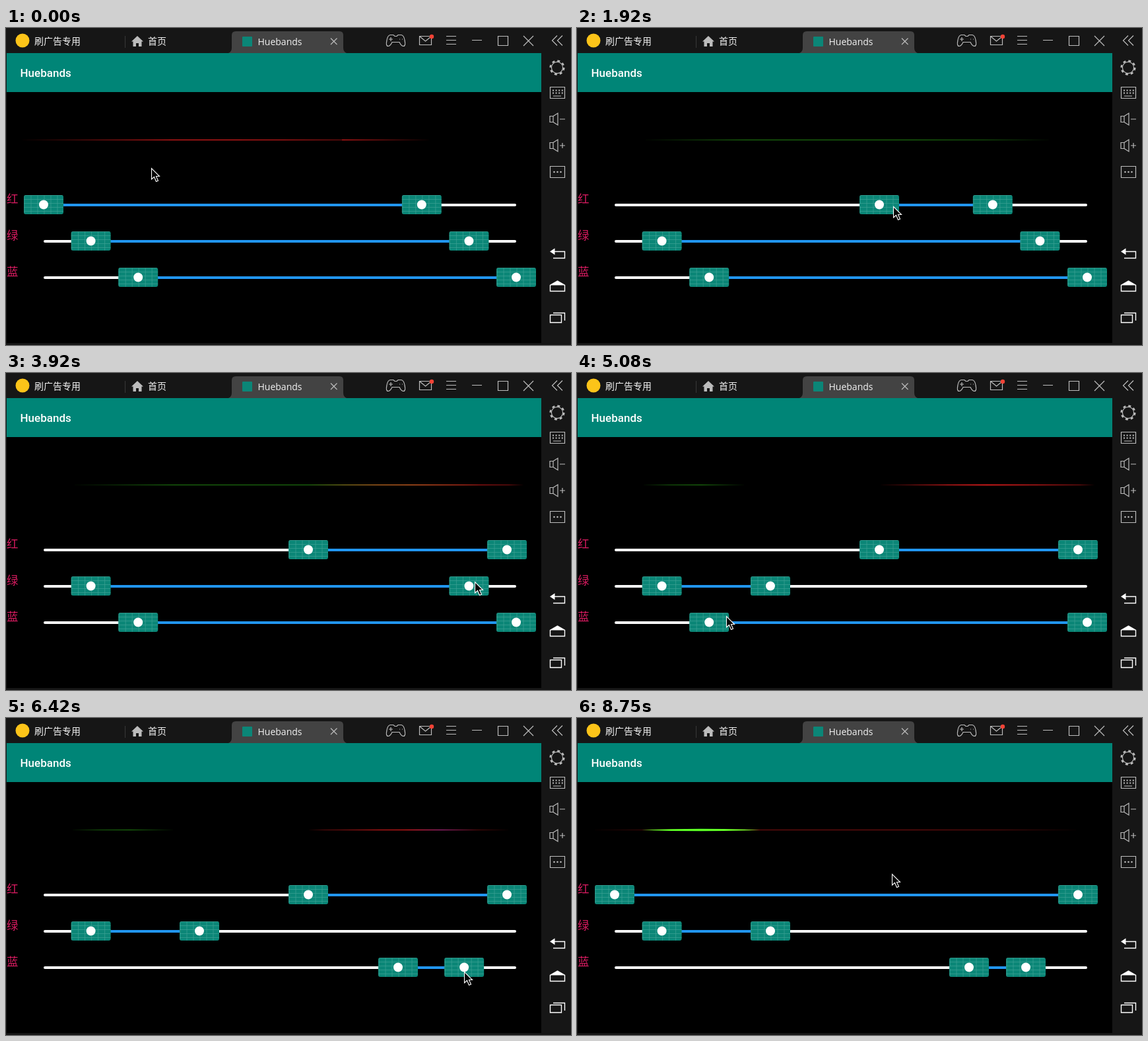
An HTML page that plays this animation: 856 px wide and 480 px high, repeating every 8830 ms.

```html
<!DOCTYPE html>
<html lang="zh">
<head>
<meta charset="utf-8">
<title>Huebands</title>
<style>
  html, body { margin: 0; width: 100%; height: 100%; overflow: hidden; background: #000; }
  svg { display: block; width: 856px; height: 480px; }
  .cjk { font-family: "Noto Sans CJK SC", "Noto Sans CJK", sans-serif; }
  .label { font-size: 17.5px; fill: #d81b60; }
  .icon { fill: none; stroke: #bcbcbc; stroke-width: 1.2; }
  .nav { stroke: #fff; stroke-width: 1.4; }
  .solid { fill: #fff; stroke: none; }
  .dots { stroke-width: 2.6; stroke-linecap: round; stroke-dasharray: 0 5; }
  .rail { stroke: #fff; stroke-width: 4; stroke-linecap: round; }
  .range { stroke: #2196f3; stroke-width: 4; }
  #waves { isolation: isolate; }
  #waves path { mix-blend-mode: screen; }
</style>
</head>
<body>
<svg viewBox="0 0 856 480">
  <defs>
    <pattern id="grid" x="-29.5" y="-14.5" width="10" height="6" patternUnits="userSpaceOnUse">
      <path d="M0 .5h10M.5 0v6" stroke="#5cb3a8" stroke-width=".7" opacity=".6"/>
    </pattern>
    <g id="thumb">
      <rect x="-30" y="-14.5" width="60" height="29" rx="3" fill="#0b8677"/>
      <rect x="-30" y="-14.5" width="60" height="29" rx="3" fill="url(#grid)"/>
      <circle r="7" fill="#fff"/>
    </g>
    <path id="speaker" d="M-11-4.5h5v9h-5zM-6-4.5 1-9V9l-7-4.5"/>
    <path id="chevron" d="M7.5-7.5 0 0l7.5 7.5"/>
  </defs>

  <rect width="856" height="480" fill="#161616"/>
  <rect x="1" y="38" width="810" height="439" fill="#000"/>
  <rect x="1" y="38" width="810" height="59" fill="#008577"/>
  <text x="21.5" y="73.5" font-family="Roboto, sans-serif" font-size="17" font-weight="500" fill="#fff">Huebands</text>

  <!-- title bar -->
  <circle cx="25" cy="19" r="10.5" fill="#fcc419"/>
  <g class="cjk" font-size="14" fill="#f2f2f2">
    <text x="43" y="24.5">刷广告专用</text>
    <text x="215" y="25">首页</text>
  </g>
  <path d="M180.5 12v18" stroke="#383838"/>
  <path d="M190 20.5 199 12l9 8.5h-2.5V28h-4.5v-5h-4v5h-4.5v-7.5z" fill="#bcbcbc"/>
  <path d="M337 38q5-2 5-8V11q0-6 6-6h157q6 0 6 6v19q0 6 5 8z" fill="#434343"/>
  <rect x="358" y="13" width="15" height="15" rx="1" fill="#0b8677"/>
  <text x="381.5" y="25.5" font-family="Open Sans, sans-serif" font-size="14" fill="#f2f2f2">Huebands</text>
  <g class="icon">
    <path d="M492 15.5l9.5 9.5M501.5 15.5 492 25"/>
    <path d="M582 10.5h5l2 2h3l2-2h5q4 1 5 8 2 9-2 9-3 0-6-6h-11q-3 6-6 6-4 0-2-9 1-7 5-8zM580 17h6M583 14v6M596 17h1M600 17h1"/>
    <path d="M626.5 12.5h18v13h-18zl9 7.5 9-7.5"/>
    <path d="M667 12.5h15M667 18.5h15M667 24.5h15"/>
    <path d="M706 18.5h15M745.5 12.5h15v14h-15zM784 12l15 15M799 12 784 27"/>
    <use href="#chevron" x="827.5" y="19"/>
    <use href="#chevron" x="835.5" y="19"/>
  </g>
  <circle cx="645" cy="13" r="3.2" fill="#f44336"/>

  <!-- side bar -->
  <g class="icon">
    <circle cx="835" cy="60" r="8.6"/>
    <circle cx="835" cy="60" r="10.3" stroke-width="2.5" stroke-dasharray="4 4.09"/>
    <path d="M824.5 89.5h22v17h-22zM829 103h12"/>
    <path d="M828 94.5h16M828 98.5h16" stroke-width="2" stroke-dasharray="2 2.6"/>
    <use href="#speaker" x="835" y="138"/>
    <use href="#speaker" x="835" y="178"/>
    <path d="M839 138h8M839 178h8M843 174v8"/>
    <path d="M824.5 209.5h22v17h-22z"/>
    <path class="dots" d="M830.5 218h11"/>
  </g>
  <g class="icon nav">
    <path d="M831 338.5h15.5v10H829"/>
    <path class="solid" d="M824 338.5l7.5-5v10z"/>
    <path d="M824.5 398.5v-9l11-6.5 11 6.5v9z"/>
    <path class="solid" d="M825 389.5l10.5-6.5 10.5 6.5z"/>
    <path d="M824.5 434.5h17v11.5h-17zM829 431.5h17.5V443"/>
  </g>

  <g id="waves"></g>
  <g id="sliders"></g>
  <path id="cursor" d="M.5.5v16.5l4-3.5 3 7 3-1.3-3-6.7h5z" fill="#050505" stroke="#fff" stroke-width="1.1"/>
</svg>
<script>
const LOOP = 8830, STEP = 1000 / 12;
const RAIL = { left: 57, right: 773, width: 716 };
const WAVE = { left: 20, width: 780, y: 169.5 };

const clamp = (x, low, high) => Math.min(Math.max(x, low), high);
const ease = u => u * u * (3 - 2 * u);
const mix = (a, b, u) => a + (b - a) * u;
const progress = (t, from, to) => ease(clamp((t - from) / (to - from), 0, 1));
const pulse = (t, peak, spread) => Math.exp(-(((t - peak) / spread) ** 2));

// each wave's half height over time
const channels = [
  { label: "红", color: "#ff2020", ends: [0, .8],
    height: t => .65 * Math.abs(Math.sin(Math.PI * (t - 1920) / 5910)) },
  { label: "绿", color: "#40ff20", ends: [.1, .9],
    height: t => .25 * Math.min(t / 1900, 1) + 1.6 * pulse(t, 8750, 300) },
  { label: "蓝", color: "#3030ff", ends: [.2, 1],
    height: t => .55 * pulse(t, 7300, 800) }
];
channels.forEach((c, i) => {
  c.y = 267.5 + 55 * i;
  c.ends = c.ends.map(v => RAIL.left + v * RAIL.width);
});

// the pointer holds a thumb at an offset of dx, dy; the last pull runs off the stage
const [red, green, blue] = channels;
const drags = [
  { channel: red, end: 0, to: 458, from: 600, until: 1830, dx: 12, dy: 2 },
  { channel: red, end: 1, to: 759, from: 2450, until: 3250, dx: 12, dy: 2 },
  { channel: green, end: 1, to: 293, from: 3920, until: 4720, dx: 9, dy: -6 },
  { channel: blue, end: 0, to: 594, from: 5200, until: 5850, dx: 12, dy: 0 },
  { channel: blue, end: 1, to: 680, from: 6100, until: 6520, dx: 0, dy: 6 },
  { channel: red, end: 0, to: -40, from: 7050, until: 7830, dx: 10, dy: 4 }
];

function pose(t) {
  const ends = new Map(channels.map(c => [c, [...c.ends]]));
  let pointer = [220, 212], free = 0;
  const travel = (x, y, until) => {
    const u = progress(t, free, until);
    pointer = [mix(pointer[0], x, u), mix(pointer[1], y, u)];
  };
  for (const d of drags) {
    const thumbs = ends.get(d.channel), x = thumbs[d.end];
    travel(x + d.dx, d.channel.y + d.dy, d.from);
    if (t < d.from) return { ends, pointer };
    const held = mix(x, d.to, progress(t, d.from, d.until));
    thumbs[d.end] = clamp(held, RAIL.left, RAIL.right);
    pointer[0] = held + d.dx;
    free = d.until;
  }
  travel(477, 236, 8750);
  return { ends, pointer };
}

function add(parent, tag, attrs) {
  const node = document.createElementNS("http://www.w3.org/2000/svg", tag);
  for (const name in attrs) node.setAttribute(name, attrs[name]);
  return parent.appendChild(node);
}

const sliders = document.getElementById("sliders");
const waves = document.getElementById("waves");
const cursor = document.getElementById("cursor");

for (const c of channels) {
  const row = { y1: c.y + .5, y2: c.y + .5 };
  add(sliders, "text", { x: 1, y: c.y - 3, class: "cjk label" }).textContent = c.label;
  add(sliders, "line", { ...row, x1: RAIL.left + 2, x2: RAIL.right - 2, class: "rail" });
  c.range = add(sliders, "line", { ...row, class: "range" });
  c.thumbs = [0, 1].map(() => add(sliders, "use", { href: "#thumb", y: c.y }));
  c.wave = add(waves, "path", { fill: c.color });
}

function lens(x0, x1, h) {
  const mid = (x0 + x1) / 2, { y } = WAVE;
  return `M${x0} ${y}Q${mid} ${y - 2 * h} ${x1} ${y}Q${mid} ${y + 2 * h} ${x0} ${y}Z`;
}

const toWave = x => WAVE.left + (x - RAIL.left) / RAIL.width * WAVE.width;

function draw(t) {
  const { ends, pointer } = pose(t);
  for (const c of channels) {
    const [low, high] = ends.get(c);
    c.thumbs[0].setAttribute("x", low);
    c.thumbs[1].setAttribute("x", high);
    c.range.setAttribute("x1", low);
    c.range.setAttribute("x2", high);
    c.wave.setAttribute("d", lens(toWave(low), toWave(high), c.height(t)));
  }
  cursor.setAttribute("transform", `translate(${pointer.map(Math.round)})`);
}

const start = performance.now();
function tick() {
  const t = (performance.now() - start) % LOOP;
  draw(Math.floor((t + 4) / STEP) * STEP);
  requestAnimationFrame(tick);
}
tick();
</script>
</body>
</html>
```
